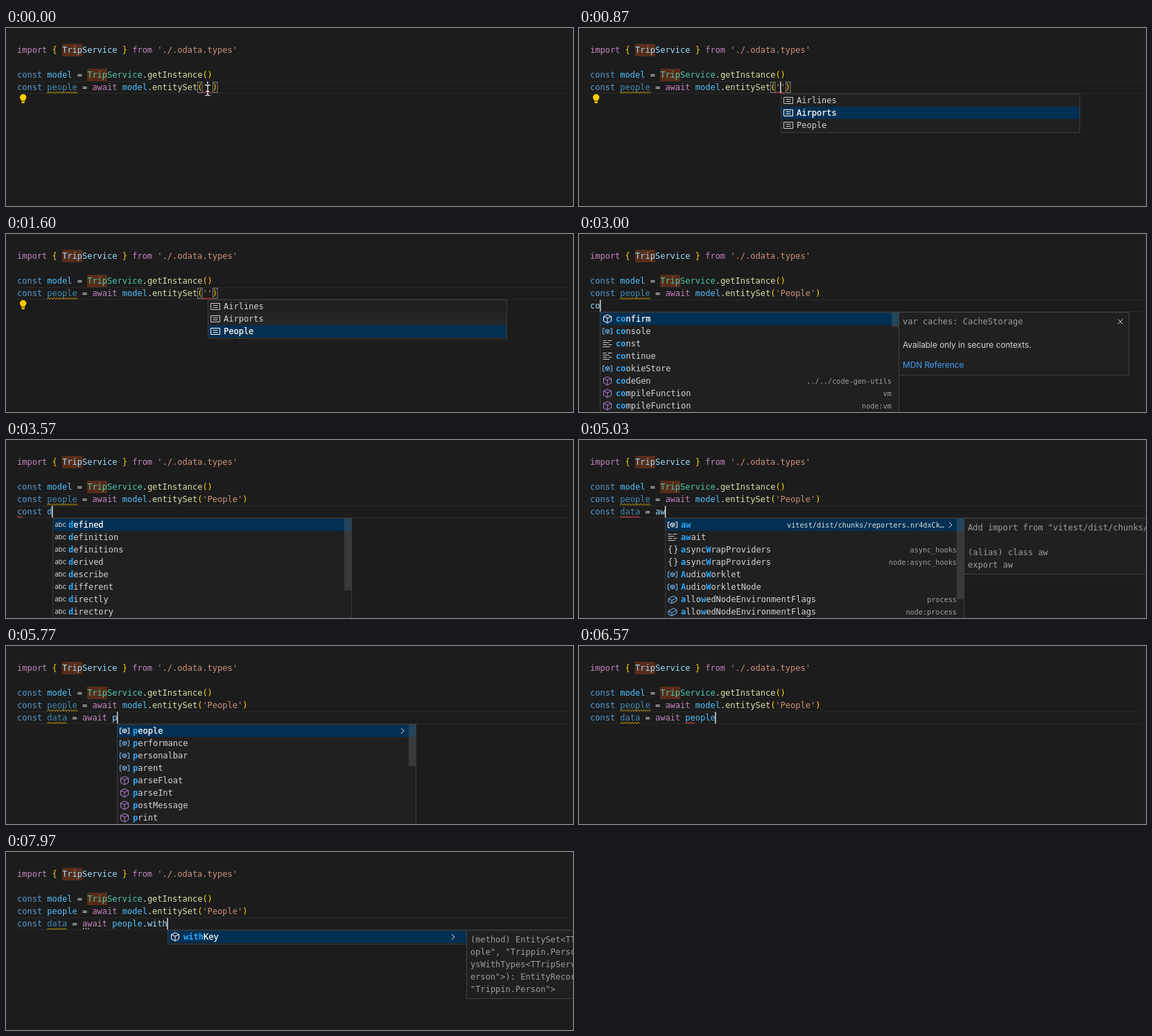
Write an HTML page that moves like this. It is 818 by 258 pixels and loops after 8 s.

```html
<!DOCTYPE html>
<html lang="en">
<head>
<meta charset="utf-8">
<title>Typed OData completion</title>
<style>
  html, body { margin: 0; width: 100%; height: 100%; overflow: hidden; background: #1c1c1c; }
  svg { display: block; width: 818px; height: 258px; font: 12px "DejaVu Sans Mono", monospace; }
  text { white-space: pre; fill: #d4d4d4; }
  path { fill: none; }
  .sans { font: 11.8px Inter, sans-serif; }
  .abc { font: 9.5px Inter, sans-serif; }
  .small { font-size: 10.2px; }
  .hit { fill: #2aaaff; font-weight: bold; }
  .selected { fill: #fff; stroke: #fff; stroke-width: .25px; }
  .selected .hit { stroke: none; }
</style>
</head>
<body>
<svg viewBox="0 0 818 258"><g id="scene"></g><rect id="caret" width="1.5" height="17" fill="#d8d8d8"/><g id="pointer">
  <path id="beam" d="M287.5 82.5q3.5 0 3.5 3v9.500q0 3-3.500 3M294.500 82.500q-3.500 0-3.500 3v9.500q0 3 3.500 3M288.500 92h5" stroke="#111" stroke-width="3"/>
  <use href="#beam"/>
  <path d="M287.500 82.500q3.500 0 3.500 3v9.500q0 3-3.500 3M294.500 82.500q-3.500 0-3.500 3v9.500q0 3 3.500 3M288.500 92h5" stroke="#eee" stroke-width="1.300"/>
</g></svg>
<script>
const LOOP = 8000, LEFT = 16, CHAR = 7.224, ROW = 18, POPUP_WIDTH = 431;

const COLORS = {
  k: '#c586c0', b: '#569cd6', s: '#4fc1ff', d: '#3e8ab3', v: '#9cdcfe', c: '#4ec9b0',
  f: '#dcdcaa', g: '#ffd700', q: '#ce9178', w: '#d4d4d4'
};

// Outlines are centred on the middle of a row.
const ICONS = {
  m: ['#b180d7', 'M0-6 5.500-3.500V3L0 6-5.500 3V-3.500ZM-5.500-3.500 0-1 5.500-3.500M0-1V6'],
  v: ['#75beff', 'M-4-4h-2.500v8h2.500M4-4h2.500v8h-2.500M0-3 3-1.500V1.500L0 3-3 1.500V-1.500ZM-3-1.500 0 0 3-1.500M0 0V3'],
  k: ['#ccc', 'M-6.500-4.500h5m2 0h6M-6.500-1.500h9M-6.500 1.500h6m2 0h5M-6.500 4.500h10'],
  e: ['#ccc', 'M-6.500-4.500h13v9h-13ZM-3.500-1.500h7M-3.500 1.500h7'],
  p: ['#75beff', 'M-6-1 1-5 6-2.500V2L-1 6-6 3.500ZM-6-1-1 1.500 6-2.500M-1 1.500V6']
};

// Each entry: icon letter, label, optional qualifier; a trailing ">" adds a chevron.
const pool = (bar, list) => ({ bar, items: list.split(';').map(s => s.split(' ')) });
const POOLS = {
  sets: pool(0, 'e Airlines;e Airports;e People'),
  c: pool(21, 'v caches;k case;k catch;k class;m cancelIdleCallback;m clearInterval;m confirm;v console;' +
    'k const;k continue;v cookieStore;m codeGen ../../code-gen-utils;m compileFunction vm;m compileFunction node:vm'),
  d: pool(104, 'a defined;a definition;a definitions;a derived;a describe;a different;a directly;a directory;' +
    'a data;a database;a dataset;a date'),
  a: pool(117, 'k abstract;m addEventListener;m afterAll;m afterEach;m alert;k any;k as;m atob;' +
    'v aw vitest/dist/chunks/reporters.nr4dxCk…>;k await;{ asyncWrapProviders async_hooks;' +
    '{ asyncWrapProviders node:async_hooks;v AudioWorklet;v AudioWorkletNode;' +
    'p allowedNodeEnvironmentFlags process;p allowedNodeEnvironmentFlags node:process'),
  p: pool(60, 'v people >;v performance;v personalbar;v parent;m parseFloat;m parseInt;m postMessage;m print'),
  members: pool(0, 'm count >;m create;m filter;m get;m orderby;m select;m top;m withKey >')
};

const DETAILS = {
  caches: ['var caches: CacheStorage'],
  aw: ['Add import from "vitest/dist/chunks/reporters', '', '(alias) class aw', 'export aw'],
  people: ['const people: EntitySet<TTripService', ', "People", "Trippin.Person">'],
  count: ['(method) EntitySet<TTripService', '"Trippin.Person">.count():', 'Promise<number>'],
  withKey: ['(method) EntitySet<TTripService', 'ople", "Trippin.Person">.with', 'ysWithTypes<TTripService',
    'erson">): EntityRecord<', '"Trippin.Person">']
};

const DECL = 'bconst |ddata ', AWAIT = DECL + '|w= |kawait ', CALL = AWAIT + '|speople';
const CLOSED = { pool: '', detail: '', query: '' };
const type = (line, query = '', extra) => ({ line, query, ...extra });

// Every step lists only what changes from the step before it.
const STEPS = [
  [0, { row: 3, arg: "''", col: 38, line: '', bulb: 1, mouse: 1, marks: [], sel: 0, ...CLOSED }],
  [450, { mouse: 0, pool: 'sets' }],
  [780, { sel: 1 }],
  [1080, { sel: 2 }],
  [1780, { ...CLOSED, sel: 0, arg: "'People'", col: 44, bulb: 0 }],
  [2200, { col: 46 }],
  [2480, { row: 4 }],
  [2680, type('vc', 'c', { pool: 'c' })],
  [2760, { detail: 'caches' }],
  [2870, type('vco', 'co')],
  [3060, type('vcon', 'con')],
  [3180, type('vcons', 'cons')],
  [3300, type('bconst', 'const', { detail: '' })],
  [3400, type('bconst ', '', { ...CLOSED, marks: [['r', 0, 1]] })],
  [3500, type('bconst |sd', 'd', { pool: 'd' })],
  [3680, type('bconst |sda', 'da')],
  [3800, type('bconst |sdat', 'dat')],
  [3920, type('bconst |sdata', 'data')],
  [4200, type(DECL, '', { ...CLOSED, marks: [['r', 6, 4]] })],
  [4320, type(DECL + '|w=')],
  [4450, type(DECL + '|w= ')],
  [4600, type(DECL + '|w= |va', 'a', { pool: 'a' })],
  [4760, type(DECL + '|w= |vaw', 'aw')],
  [4900, { detail: 'aw' }],
  [5150, type(DECL + '|w= |vawa', 'awa', { detail: '' })],
  [5260, type(DECL + '|w= |vawai', 'awai')],
  [5370, type(DECL + '|w= |kawait', 'await', CLOSED)],
  [5500, type(AWAIT, '', { marks: [['y', 6, 4]] })],
  [5680, type(AWAIT + '|vp', 'p', { pool: 'p' })],
  [5780, { detail: 'people' }],
  [5900, type(AWAIT + '|vpe', 'pe')],
  [6080, { marks: [['y', 6, 4], ['r', 19, 2]] }],
  [6250, type(CALL, '', CLOSED)],
  [6800, type(CALL + '|w.', '', { pool: 'members', marks: [['y', 6, 4]] })],
  [6950, { detail: 'count', used: 1, hint: 1 }],
  [7560, type(CALL + '|w.|vw', 'w', { detail: 'withKey' })],
  [7660, type(CALL + '|w.|vwi', 'wi')],
  [7760, type(CALL + '|w.|vwit', 'wit')],
  [7860, type(CALL + '|w.|vwith', 'with')]
];

let carried = {};
const states = STEPS.map(([at, change]) => (carried = { ...carried, ...change, at }));

const esc = s => s.replace(/&/g, '&amp;').replace(/</g, '&lt;');
const colX = col => LEFT + col * CHAR;
const rowY = row => 32 + row * ROW;
const text = (x, y, body, attrs = '') => `<text x="${x}" y="${y + 4}" ${attrs}>${body}</text>`;
const rect = (x, y, w, h, fill, stroke = 'none') =>
  `<rect x="${x}" y="${y}" width="${w}" height="${h}" fill="${fill}" stroke="${stroke}"/>`;
const path = (x, y, d, stroke) => `<path transform="translate(${x} ${y})" d="${d}" stroke="${stroke}"/>`;

const code = (row, tokens) => text(LEFT, rowY(row), tokens.split('|').map(t =>
  `<tspan fill="${COLORS[t[0]]}">${esc(t.slice(1))}</tspan>`).join(''));

const lineLength = tokens => tokens ? tokens.split('|').reduce((n, t) => n + t.length - 1, 0) : 0;

function squiggle(row, [kind, col, length]) {
  const width = length * CHAR;
  let d = 'M0 1';
  for (let x = 2; x <= width + 1; x += 2) d += `L${x} ${x / 2 % 2 ? -1.2 : 1.2}`;
  return path(colX(col), rowY(row) + 7.5, d, kind === 'r' ? '#f14c4c' : '#cca700');
}

function matches(label, query) {
  let i = 0;
  for (const ch of label.toLowerCase()) if (ch === query[i]) i++;
  return i === query.length;
}

function highlight(label, query) {
  let i = 0;
  return [...label].map(ch =>
    ch.toLowerCase() === query[i] ? (i++, `<tspan class="hit">${ch}</tspan>`) : ch).join('');
}

function icon(kind, x, y, selected) {
  if (kind === 'a') return text(x - 7.5, y - .7, 'abc', 'class="abc"');
  if (kind === '{') return text(x - 7, y, '{}', 'style="letter-spacing:1px"');
  const [color, d] = ICONS[kind];
  return path(x, y, d, selected ? '#fff' : color);
}

function detailBox(x, top, name) {
  const lines = DETAILS[name], doc = name === 'caches';
  let out = rect(x + .5, top + .5, 332, doc ? 91 : lines.length * ROW + 9, '#202020', '#414141');
  lines.forEach((line, i) => out += text(x + 6, top + 14 + i * ROW, esc(line), 'style="fill:#9d9d9d"'));
  if (doc) {
    out += text(x + 6, top + 48, 'Available only in secure contexts.', 'class="sans"') +
      text(x + 6, top + 77, 'MDN Reference', 'class="sans" style="fill:#3f9ff5"') +
      path(x + 320, top + 14, 'M-3.500-3.500 3.500 3.500M3.500-3.500-3.500 3.500', '#ccc');
  }
  return out;
}

function popup(state, caretX) {
  const { bar, items } = POOLS[state.pool];
  const shown = items.filter(item => matches(item[1], state.query)).slice(0, 8);
  const x = Math.round(caretX), right = x + POPUP_WIDTH, top = rowY(state.row) + 9;
  let out = rect(x + .5, top + .5, POPUP_WIDTH, shown.length * ROW + 2, '#202020', '#3c3c3c');
  shown.forEach(([kind, label, note = ''], i) => {
    const y = top + 10 + i * ROW, selected = i === state.sel;
    if (selected) out += rect(x + 1, y - 9, POPUP_WIDTH - 1, ROW, '#023052');
    else if (state.pool === 'sets' && i === 1) out += rect(x + 1, y - 9, POPUP_WIDTH - 1, ROW, '#252527');
    out += icon(kind, x + 11, y, selected) +
      text(x + 23, y, highlight(label, state.query), selected ? 'class="selected"' : '');
    const chevron = note.endsWith('>');
    if (chevron && selected) out += path(right - 19, y, 'M-2-4 2 0-2 4', '#ddd');
    if (note && (selected || !chevron)) {
      out += text(right - (chevron ? 28 : 10), y - .5, note.replace('>', ''),
        `class="small" text-anchor="end" style="fill:${selected ? '#ddd' : '#9d9d9d'}"`);
    }
  });
  if (bar && shown.length === 8) out += rect(right - 10, top + 1, 10, bar, 'rgba(121,121,121,.28)');
  return out + (state.detail ? detailBox(right, top, state.detail) : '');
}

const caretColumn = state => state.row === 3 ? state.col : lineLength(state.line);

function draw(state) {
  const y = rowY(state.row), name = state.used ? 's' : 'd';
  let out = rect(LEFT, y - 9, 798, 1, '#292929') + rect(LEFT, y + 8, 798, 1, '#292929') +
    rect(815, 0, 1, 258, '#222') +
    rect(colX(9), 23, 4 * CHAR, ROW, '#582d19') + rect(colX(14), 59, 4 * CHAR, ROW, '#582d19') +
    code(0, "kimport |g{ |vTripService |g} |kfrom |q'./.odata.types'") +
    code(2, 'bconst |smodel |w= |cTripService|w.|fgetInstance|g()') +
    code(3, `bconst |${name}people |w= |kawait |smodel|w.|fentitySet|g(|q${state.arg}|g)`);
  if (!state.used) out += squiggle(3, ['y', 6, 6]);
  if (state.arg === "''") out += squiggle(3, ['r', 37, 2]);
  if (state.row === 3) {
    for (const col of [36, 37 + state.arg.length])
      out += rect(Math.round(colX(col)) + .5, 78.5, 6.5, 15, 'none', '#808080');
  }
  if (state.line) out += code(4, state.line);
  out += state.marks.map(mark => squiggle(4, mark)).join('');
  if (state.hint) for (const x of [111, 114.5, 118]) out += rect(x, 110, 1.7, 1.7, '#aaa');
  if (state.bulb) {
    out += '<path d="M22 105.500C22 103.500 20 103 20 100.500a4.700 4.700 0 0 1 9.400 0C29.400 103 27.300 103.500 27.300 105.500Z' +
      'M22.300 106.500h4.700v1.500l-1 1h-2.700l-1-1Z" style="fill:#fc0"/>';
  }
  if (state.pool) out += popup(state, colX(caretColumn(state)));
  return out;
}

const scene = document.getElementById('scene');
const caret = document.getElementById('caret');
const pointer = document.getElementById('pointer');
let current;

function tick() {
  const time = performance.now() % LOOP;
  const state = states.findLast(s => s.at <= time);
  if (state !== current) {
    current = state;
    scene.innerHTML = draw(state);
    caret.setAttribute('x', colX(caretColumn(state)) - .5);
    caret.setAttribute('y', rowY(state.row) - 8.5);
    pointer.style.display = state.mouse ? '' : 'none';
  }
  caret.style.opacity = (time - state.at) % 1000 < 500 ? 1 : 0;
  requestAnimationFrame(tick);
}
tick();
</script>
</body>
</html>
```
